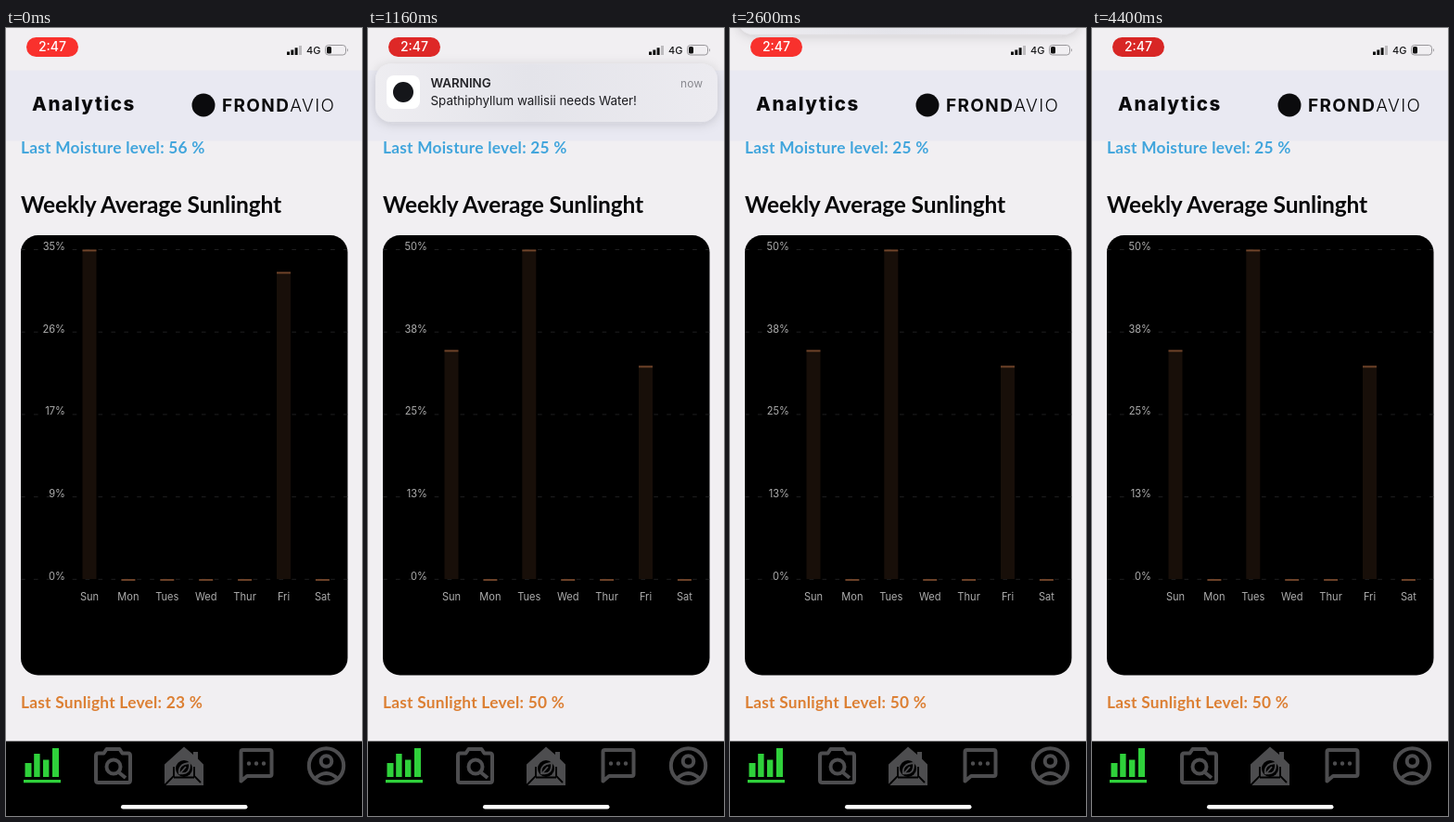
An HTML page for the animation above (4440 ms loop, 384x848 px).

```html
<!DOCTYPE html>
<html lang="en">
<head>
<meta charset="utf-8">
<title>Plant analytics</title>
<style>
  html, body { margin: 0; width: 100%; height: 100%; overflow: hidden; background: #f1eff2; }
  svg { display: block; width: 100%; height: 100%; }
  text { font-family: Inter, Roboto, sans-serif; }
  .lato { font-family: Lato, "Open Sans", sans-serif; font-weight: 700; }
  .level { font-size: 17.3px; letter-spacing: .25px; }
  .axis text { font-size: 11.1px; fill: #adadad; }
  .line { fill: none; stroke: #4d4d4f; stroke-width: 4; stroke-linejoin: round; }
</style>
</head>
<body>
<svg viewBox="0 0 384 848" xmlns="http://www.w3.org/2000/svg">
  <defs>
    <linearGradient id="glass">
      <stop offset="0" stop-color="#eeedf1"/>
      <stop offset=".45" stop-color="#e4e4ea"/>
      <stop offset="1" stop-color="#ecebf0"/>
    </linearGradient>
    <filter id="shade" x="-10%" y="-50%" width="120%" height="200%">
      <feDropShadow dx="0" dy="2" stdDeviation="6" flood-color="#223" flood-opacity=".17"/>
    </filter>
    <clipPath id="cardClip"><rect x="16" y="223" width="352.5" height="473.5" rx="18.5"/></clipPath>
  </defs>

  <rect width="384" height="848" fill="#f1eff2"/>
  <rect y="45.5" width="384" height="76" fill="#e9e9f2"/>
  <text x="28" y="89" font-size="20.5" font-weight="800" letter-spacing="1.6" fill="#0b0b0d">Analytics</text>
  <circle cx="213" cy="83" r="12.5" fill="#0b0b0d"/>
  <text x="233" y="89.5" font-size="19" letter-spacing="1.35" fill="#0b0b0d"><tspan font-weight="700">FROND</tspan><tspan font-weight="300">AVIO</tspan></text>

  <text id="moisture" class="lato level" x="16" y="135" fill="#41a5dc"></text>
  <text class="lato" x="16" y="199" font-size="24.5" letter-spacing="-.15" fill="#09090b">Weekly Average Sunlinght</text>
  <rect x="16" y="223" width="352.5" height="473.5" rx="18.5"/>
  <g id="chart" class="axis" clip-path="url(#cardClip)"></g>
  <text id="sunlight" class="lato level" x="16" y="731.5" fill="#dc7f33"></text>

  <rect y="767.5" width="384" height="80.5"/>
  <path fill="#2fd13b" d="M20.5 791h7v15h-7zM30.2 781h6.4v25h-6.4zM40 787.5h6.4v18.5h-6.4zM50 775h7v31h-7zM19 809h40v3.2h-40z"/>
  <g class="line">
    <path d="M99.5 780.5h6l3-4.5h14l3 4.500h6q2.500 0 2.500 2.500v26.500q0 2.500-2.500 2.500h-32q-2.500 0-2.500-2.500v-26.500q0-2.500 2.500-2.500z"/>
    <circle cx="116" cy="795" r="7.500"/>
    <path d="M121 800.500l8 6.500"/>
  </g>
  <path fill="#4d4d4f" d="M192 773.500l10 8.500v-3h5v7.500l6 6v22.500h-42v-22.500z"/>
  <path d="M181 795v10l-10 10M203 795v10l7 7M181 806.500h22" fill="none" stroke="#000" stroke-width="1.8"/>
  <circle cx="192" cy="797" r="9"/>
  <path d="M187 803q-2-11 11-12 1 13-10 11M187 803l7-8" fill="none" stroke="#4d4d4f" stroke-width="1.8"/>
  <g class="line">
    <path d="M255.500 777h29q2 0 2 2v24q0 2-2 2h-24.500l-6.500 5.500v-31.500q0-2 2-2z"/>
    <circle cx="345.500" cy="794" r="18.700"/>
    <circle cx="345.500" cy="789" r="5.800"/>
    <path d="M333 808q12.500-12 25 0"/>
  </g>
  <path d="M262 791.500h.01M270 791.500h.01M278 791.500h.01" stroke="#4d4d4f" stroke-width="4.400" stroke-linecap="round"/>
  <rect x="124" y="836" width="136.500" height="4.600" rx="2.300" fill="#fff"/>

  <g id="banner">
    <rect x="8" y="38.500" width="369" height="62.500" rx="17" fill="url(#glass)" filter="url(#shade)"/>
    <rect x="20" y="51" width="36" height="36" rx="8" fill="#fff"/>
    <circle cx="38" cy="69" r="11" fill="#15161a"/>
    <text x="67.500" y="64" font-size="13.400" font-weight="600" fill="#232327">WARNING</text>
    <text x="67.500" y="82.500" font-size="13.400" fill="#1c1c20">Spathiphyllum wallisii needs Water!</text>
    <text x="361" y="63.500" font-size="12" text-anchor="end" fill="#88888e">now</text>
  </g>

  <rect id="pill" x="22" y="10" width="56" height="21" rx="10.500"/>
  <text x="50" y="25.300" font-size="14" font-weight="500" text-anchor="middle" fill="#fff">2:47</text>
  <path d="M303 25.500h3v3.500h-3zM307.300 23.500h3v5.500h-3zM311.600 21.200h3v7.800h-3z" fill="#111"/>
  <path d="M316 19h3v10h-3z" fill="#bdbbbe"/>
  <text x="324" y="28.300" font-size="11" font-weight="500" fill="#1a1a1c">4G</text>
  <rect x="344.500" y="18.500" width="22" height="10.500" rx="3.200" fill="none" stroke="#98969a"/>
  <rect x="346" y="20" width="5" height="7.500" rx="1.600" fill="#111"/>
  <path d="M368 22q2 1.700 0 3.800z" fill="#98969a"/>
</svg>
<script>
const LOOP = 4440, REFRESH = 280, BASE = 593;
const STEP_X = 41.9, FIRST_X = 90;
const DAYS = ["Sun", "Mon", "Tues", "Wed", "Thur", "Fri", "Sat"];
const STATES = [
  { moisture: 56, sunlight: 23, scale: [35, 26, 17, 9, 0], tops: { Sun: 238.5, Fri: 262.5 } },
  { moisture: 25, sunlight: 50, scale: [50, 38, 25, 13, 0], tops: { Sun: 346.5, Tues: 238.5, Fri: 363.5 } }
];
// [time, vertical offset, easing used to reach it]
const SLIDE = [
  [0, -125], [680, -125], [1100, 0, p => 1 - (1 - p) ** 3],
  [2300, 0], [2600, -94, p => p * p * (3 - 2 * p)], [2700, -125], [LOOP, -125]
];
const $ = id => document.getElementById(id);

function add(parent, tag, attrs, text) {
  const el = document.createElementNS("http://www.w3.org/2000/svg", tag);
  for (const key in attrs) el.setAttribute(key, attrs[key]);
  if (text) el.textContent = text;
  parent.append(el);
  return el;
}

function buildChart({ scale, tops }) {
  const group = add($("chart"), "g", {});
  scale.forEach((value, i) => {
    const y = 238.5 + i * 88.7;
    add(group, "line", { x1: 16, x2: 369, y1: y, y2: y, stroke: "#1f1f20", "stroke-dasharray": "4.64 9.28" });
    add(group, "text", { x: 64, y: y + .5, "text-anchor": "end" }, value + "%");
  });
  DAYS.forEach((day, i) => {
    const x = FIRST_X + i * STEP_X, top = tops[day] ?? BASE;
    add(group, "rect", { x: x - 7.5, y: top, width: 15, height: BASE - top, fill: "#180f09" });
    add(group, "rect", { x: x - 7.5, y: top, width: 15, height: 1.9, fill: "#70442a" });
    add(group, "text", { x, y: 616, "text-anchor": "middle" }, day);
  });
  return group;
}

const charts = STATES.map(buildChart);
let shown = -1;

function showState(index) {
  if (index === shown) return;
  shown = index;
  charts.forEach((chart, i) => chart.setAttribute("display", i === index ? "inline" : "none"));
  $("moisture").textContent = `Last Moisture level: ${STATES[index].moisture} %`;
  $("sunlight").textContent = `Last Sunlight Level: ${STATES[index].sunlight} %`;
}

function slideAt(t) {
  const i = SLIDE.findIndex(step => step[0] > t);
  const [t0, y0] = SLIDE[i - 1], [t1, y1, ease = p => p] = SLIDE[i];
  return y0 + (y1 - y0) * ease((t - t0) / (t1 - t0));
}

function draw(t) {
  showState(t < REFRESH ? 0 : 1);
  $("banner").setAttribute("transform", `translate(0 ${slideAt(t).toFixed(2)})`);
  const glow = .5 + .5 * Math.cos((t - 100) / 800 * 2 * Math.PI);
  const mix = (dark, light) => Math.round(dark + (light - dark) * glow);
  $("pill").setAttribute("fill", `rgb(${mix(210, 255)},${mix(36, 51)},${mix(36, 46)})`);
}

function tick() {
  draw(performance.now() % LOOP);
  requestAnimationFrame(tick);
}
tick();
</script>
</body>
</html>
```
